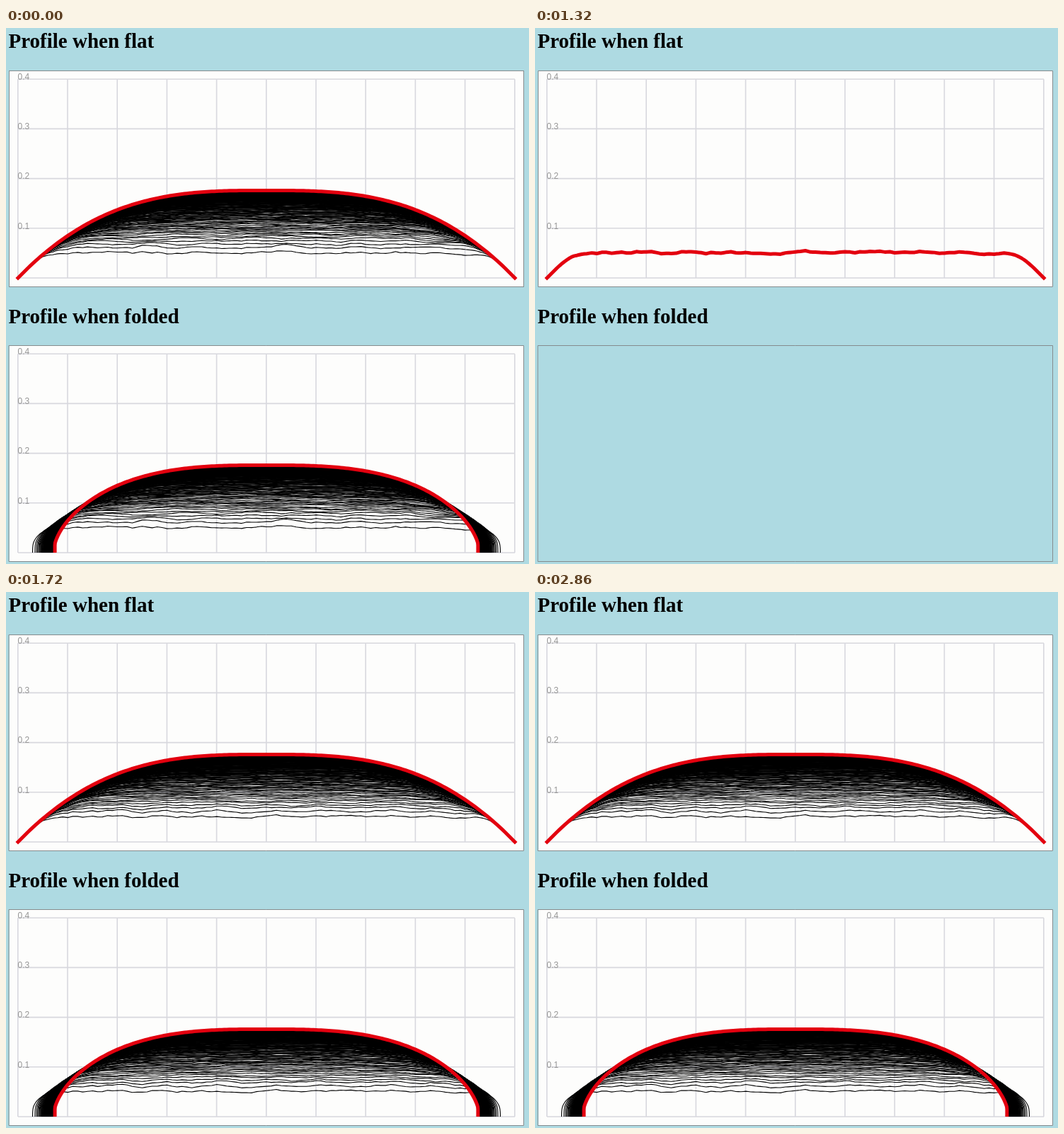
An HTML page with a canvas that plays this animation: 739x757 px, repeating every 3110 ms.

```html
<!DOCTYPE html>
<html lang="en">
<head>
<meta charset="utf-8">
<title>Profiles</title>
<style>
  html, body { margin: 0; width: 100%; height: 100%; overflow: hidden; background: #aedae2; }
  canvas { display: block; }
</style>
</head>
<body>
<canvas id="stage" width="739" height="757"></canvas>
<script>
const ctx = document.getElementById('stage').getContext('2d');
const LOOP = 3110, RESET = 1320, DONE = 1520, TICK = 100 / 3;
const LEFT = 17, SPAN = 702, HALF = SPAN / 2, CELL = 70.2;
const SEGS = 200, STEP = SPAN / SEGS;
const COUNT = 300, RATE = 1.47, PEAK = 123.6;

function random(seed) {
  return () => {
    seed = (seed * 1664525 + 1013904223) >>> 0;
    return seed / 4294967296 * 2 - 1;
  };
}

// Height of the finished profile at distance d from the nearer end
function limit(d) {
  return Math.min(d, PEAK * (1 - Math.pow(1 - d / HALF, 2.95)));
}

// The finished profile, flattened so that its middle has the given height
function profile(top) {
  const cut = Math.pow(top, -4) - Math.pow(PEAK, -4);
  return Array.from({ length: SEGS + 1 }, (_, i) => {
    const d = Math.min(i, SEGS - i) * STEP;
    return d ? Math.pow(Math.pow(limit(d), -4) + cut, -0.25) : 0;
  });
}

// Folding keeps the arc length, so slopes of one become vertical
function foldedX(base) {
  const xs = [];
  xs[SEGS / 2] = LEFT + HALF;
  for (let i = SEGS / 2; i < SEGS; i++) {
    const slope = Math.min(1, Math.abs(base[i + 1] - base[i]) / STEP);
    xs[i + 1] = xs[i] + STEP * Math.sqrt(1 - slope * slope);
  }
  for (let i = 0; i < SEGS / 2; i++) xs[i] = 2 * xs[SEGS / 2] - xs[SEGS - i];
  return xs;
}

function buildRun(seed) {
  const rnd = random(seed);
  let drift = new Array(SEGS / 2 + 1).fill(0);
  const curves = [];
  for (let k = 1; k <= COUNT; k++) {
    const grow = 36 * Math.pow(k, 0.27);
    const base = profile(grow / Math.pow(1 + Math.pow(grow / PEAK, 8), 1 / 8));
    const raw = Array.from({ length: drift.length + 4 }, rnd);
    const amp = 4 / Math.sqrt(k) + 1.2 * Math.exp(-k / 80);
    drift = drift.map((v, i) =>
      0.6 * v + amp * (raw[i] + raw[i + 1] + raw[i + 2] + raw[i + 3] + raw[i + 4]) / 5);
    const h = base.map((b, i) => {
      if (i === 0 || i === SEGS) return b;
      const slope = Math.min(1, Math.abs(base[i + 1] - base[i - 1]) / (2 * STEP));
      const noise = (drift[i >> 1] + drift[(i + 1) >> 1]) / 2;
      return b + noise * Math.pow(1 - slope, 1.5);
    });
    curves.push({ h, fold: foldedX(base) });
  }
  const end = profile(PEAK);
  curves.push({ h: end, fold: foldedX(end) });
  return curves;
}

const runs = [buildRun(71), buildRun(2024)];

function trace(curve, ground, folded) {
  ctx.beginPath();
  for (let i = 0; i <= SEGS; i++) {
    ctx.lineTo(folded ? curve.fold[i] : LEFT + i * STEP, ground - curve.h[i]);
  }
  ctx.stroke();
}

function frame(top) {
  ctx.strokeStyle = '#858b8d';
  ctx.lineWidth = 1;
  ctx.strokeRect(4.5, top + 0.5, 727, 305);
}

function grid(ground) {
  ctx.strokeStyle = '#d8d8de';
  ctx.lineWidth = 1.6;
  ctx.lineCap = 'butt';
  ctx.beginPath();
  for (let i = 0; i <= 10; i++) {
    const x = LEFT - 0.2 + i * CELL;
    ctx.moveTo(x, ground - 4 * CELL);
    ctx.lineTo(x, ground);
  }
  for (let i = 0; i <= 4; i++) {
    ctx.moveTo(LEFT, ground - i * CELL);
    ctx.lineTo(LEFT + SPAN, ground - i * CELL);
  }
  ctx.stroke();

  ctx.fillStyle = '#969696';
  ctx.font = '12px "Liberation Sans", Arial, sans-serif';
  for (let i = 1; i <= 4; i++) ctx.fillText('0.' + i, 16.5, ground + 0.8 - i * CELL);
}

function chart(top, curves, count, folded) {
  const ground = top + 293;
  ctx.fillStyle = '#fdfdfc';
  ctx.fillRect(5, top + 1, 727, 305);
  frame(top);
  grid(ground);

  ctx.lineJoin = 'round';
  ctx.strokeStyle = '#000';
  ctx.lineWidth = 1.1;
  for (let k = 0; k < count; k++) trace(curves[k], ground, folded);
  ctx.strokeStyle = '#e3000f';
  ctx.lineWidth = 5;
  ctx.lineCap = folded ? 'butt' : 'square';
  trace(curves[count - 1], ground, folded);
}

function heading(text, y) {
  ctx.fillStyle = '#000';
  ctx.font = 'bold 29px "Liberation Serif", "Times New Roman", serif';
  ctx.fillText(text, 3.5, y);
}

function draw(run, count) {
  ctx.fillStyle = '#aedae2';
  ctx.fillRect(0, 0, 739, 757);
  heading('Profile when flat', 28);
  heading('Profile when folded', 416.5);
  chart(60, runs[run], count, false);
  if (count > COUNT) chart(448, runs[run], count, true);
  else frame(448);
}

let shown = '';
function tick() {
  const t = performance.now() % LOOP;
  const run = t < RESET ? 0 : 1;
  let count = COUNT + 1;
  if (run && t < DONE) {
    // The 0.5 ms slack keeps rounded times on their own step
    const steps = Math.floor((t - RESET + 0.5) / TICK);
    count = 1 + Math.round(steps * TICK * RATE);
  }
  const key = run + ':' + count;
  if (key !== shown) {
    shown = key;
    draw(run, count);
  }
  requestAnimationFrame(tick);
}
tick();
</script>
</body>
</html>
```
